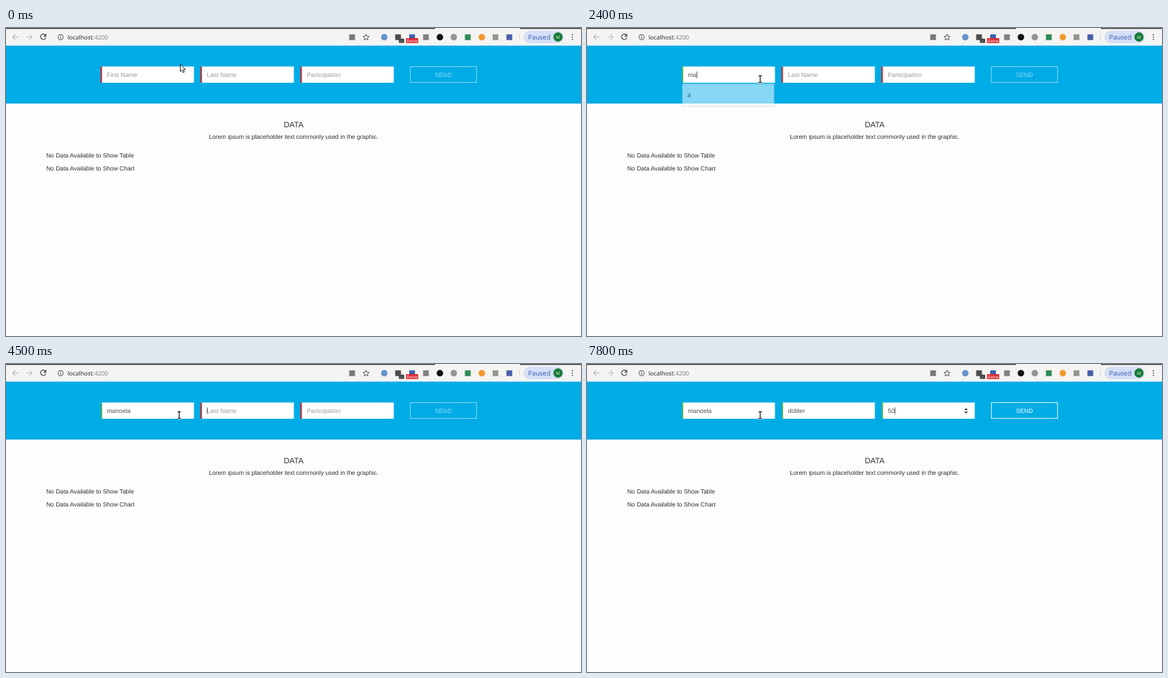
Recreate the animation shown at these times as an HTML page. Size 800 by 428 pixels, loop 8 s.

```html
<!DOCTYPE html>
<html lang="en">
<head>
<meta charset="utf-8">
<title>Participation form</title>
<style>
  html, body { margin: 0; width: 100%; height: 100%; overflow: hidden; background: #fefdfe; }
  svg { display: block; width: 100vw; height: 100vh; }
  text { font: 8.45px "Liberation Sans", Arial, sans-serif; fill: #2b2f33; text-rendering: geometricPrecision; }
  .ui { font-family: "Noto Sans", sans-serif; }
  .mid { text-anchor: middle; }
  .entry { font-size: 8.6px; fill: #495057; }
  .hint { fill: #969a9e; }
  .line { fill: none; stroke: #4b4b4b; stroke-width: 1.2; }
</style>
</head>
<body>
<svg viewBox="0 0 800 428">
  <rect width="800" height="428" fill="#fefdfe"/>

  <!-- browser toolbar -->
  <rect width="800" height="24.5" fill="#f5f4f3"/>
  <path d="M0 0H597V1.2H0zM715 0H800V1.2H715z" fill="#3b3a37"/>
  <path class="line" d="M17.5 12.5H9.5M13 8.7L9.2 12.5L13 16.3" style="stroke:#b9b8b7"/>
  <path class="line" d="M28 12.5H36M32.5 8.7L36.3 12.5L32.5 16.3" style="stroke:#c3c2c1"/>
  <path class="line" d="M54.7 9.6A3.8 3.8 0 1 0 55.5 13.5"/>
  <path d="M56 7.8V12H51.8z" fill="#4b4b4b"/>
  <circle class="line" cx="76" cy="12.7" r="3.7" style="stroke-width:.9"/>
  <path d="M75.5 12.1H76.5V15H75.5zM75.5 10.3H76.5V11.3H75.5z" fill="#4b4b4b"/>
  <text class="ui" x="85.7" y="15.7" style="font-size:8.3px">localhost<tspan fill="#85878a">:4200</tspan></text>
  <path class="line" d="M501 8.6L502.2 11.4L505.2 11.7L502.9 13.7L503.6 16.7L501 15.1L498.4 16.7L499.1 13.7L496.8 11.7L499.8 11.4z" style="stroke-width:.9"/>
  <g id="badges"></g>
  <rect x="546.5" y="14.8" width="7.5" height="6" rx="1" fill="#4a4a4a"/>
  <text class="ui mid" x="550.2" y="18.8" style="font-size:5px;fill:#fff">..</text>
  <rect x="556.5" y="14" width="17" height="7" rx="1.2" fill="#d92d35"/>
  <text class="ui mid" x="565" y="19.6" style="font-size:5.8px;fill:#fff">Extra</text>
  <path d="M714.5 8V18" stroke="#d3d3d3" stroke-width=".8"/>
  <rect x="720" y="4" width="56" height="17" rx="8.5" fill="#d5e0f6"/>
  <text class="ui" x="726.5" y="15.8" style="font-size:9px;fill:#3b5fbb">Paused</text>
  <circle cx="768" cy="12.5" r="6.4" fill="#187a35"/>
  <text class="ui mid" x="768" y="14.7" style="font-size:6px;fill:#d7eedc">M</text>
  <path d="M788 9.4h.01M788 12.6h.01M788 15.8h.01" stroke="#4b4b4b" stroke-width="1.8" stroke-linecap="round"/>

  <!-- page -->
  <rect y="24.5" width="800" height="80.5" fill="#00ace6"/>
  <g id="fields"></g>
  <g id="send">
    <rect x="562.7" y="53.7" width="92" height="22" fill="none" stroke="#fff" stroke-width=".9"/>
    <text class="mid" x="608.6" y="67.8" style="font-size:8.5px;fill:#fff">SEND</text>
  </g>
  <g id="spinner" fill="#3d3d3d">
    <path d="M524.8 64L527.4 61.2L530 64zM524.8 66L527.4 68.8L530 66z"/>
  </g>
  <text class="mid" x="400.2" y="138.3" style="font-size:10.9px">DATA</text>
  <text class="mid" x="400.2" y="154">Lorem ipsum is placeholder text commonly used in the graphic.</text>
  <text x="56" y="180">No Data Available to Show Table</text>
  <text x="56" y="198.3">No Data Available to Show Chart</text>

  <g id="suggest">
    <rect x="131" y="78" width="131.3" height="31.8" rx="1" fill="#000" opacity=".16"/>
    <rect x="131.4" y="77.2" width="130.2" height="31.4" rx="1" fill="#fff" stroke="#c4c8ca" stroke-width=".6"/>
    <text class="ui" x="138.3" y="95.9" style="font-size:9px;font-weight:500;fill:#1c1c1c">a</text>
  </g>
  <rect id="caret" y="60.3" width=".8" height="9.2" fill="#333"/>
  <path id="arrow" d="M0 0V10.2L2.3 8.2L3.9 11.6L5.6 10.8L4.1 7.5H7.1z" fill="#fff" stroke="#111" stroke-width=".9"/>
  <g id="beam" fill="none">
    <path d="M-2.6 -4.7H2.6M-2.6 4.7H2.6M0 -4.7V4.7" stroke="#fff" stroke-width="2.6"/>
    <path d="M-2.4 -4.7H2.4M-2.4 4.7H2.4M0 -4.7V4.7" stroke="#222" stroke-width="1.3"/>
  </g>
</svg>
<script>
const LOOP = 8000, STEP = 100, LAST_STEP = 7800, BLINK = 500;
const $ = id => document.getElementById(id);
const clamp = v => Math.max(0, Math.min(1, v));
const show = (el, on) => el.setAttribute('visibility', on ? 'visible' : 'hidden');

// Extension buttons as plain shapes: [x, colour, round]
$('badges').innerHTML = [
  [481.5, '#77797b', 0], [526.3, '#6795cd', 1], [545.5, '#4b4b4b', 0],
  [565, '#3b61b3', 0], [584.3, '#808284', 0], [603.7, '#111', 1],
  [623, '#929496', 1], [642.5, '#2f8b57', 0], [662, '#f09a2c', 1],
  [681, '#96958f', 0], [700.3, '#4b5fa8', 0]
].map(([x, fill, round]) => round
  ? `<circle cx="${x}" cy="12.8" r="4.5" fill="${fill}"/>`
  : `<rect x="${x - 4}" y="8.8" width="8" height="8" fill="${fill}"/>`).join('');

const fields = ['First Name', 'Last Name', 'Participation'].map((hint, i) => {
  const x = 131.5 + i * 139;
  const g = document.createElementNS('http://www.w3.org/2000/svg', 'g');
  g.innerHTML = `<rect x="${x + .5}" y="53.5" width="129.5" height="22.6" fill="#fff"/>
    <rect y="53.5" height="22.6"/><text class="entry" x="${x + 8.9}" y="67.8"></text>`;
  $('fields').append(g);
  return { hint, x, bar: g.children[1], text: g.children[2] };
});

// Focus and key presses: [time, field, value]
const typed = (field, word, times) => times.map((t, i) => [t, field, word.slice(0, i + 1)]);
const inputs = [
  [500, 0, ''], ...typed(0, 'manoela', [2300, 2400, 3000, 3200, 3300, 3400, 3500]),
  [4100, 1, ''], ...typed(1, 'dobler', [5200, 5300, 5400, 5600, 5700, 5800]),
  [6200, 2, ''], ...typed(2, '50', [7200, 7400])
];

function drawFields(t) {
  const values = ['', '', ''];
  let current = null;
  for (const input of inputs) {
    if (input[0] > t) break;
    current = input;
    values[input[1]] = input[2];
  }
  fields.forEach(({ hint, x, bar, text }, i) => {
    const value = values[i];
    text.textContent = value || hint;
    text.classList.toggle('hint', !value);
    bar.setAttribute('x', value ? x + .6 : x);
    bar.setAttribute('width', value ? 1.6 : 2.1);
    bar.setAttribute('fill', value ? '#36a83c' : '#bd2a2a');
  });
  show($('caret'), current && Math.floor((t - current[0]) / BLINK) % 2 === 0);
  if (current) {
    const { x, text } = fields[current[1]];
    const width = current[2] ? text.getComputedTextLength() : 0;
    $('caret').setAttribute('x', x + 9.1 + width);
  }
  show($('spinner'), current && current[1] === 2);
  $('send').setAttribute('opacity', values[2] ? 1 : .58);
}

function drawSuggestion(t) {
  const opacity = t < 2300 ? clamp((t - 500) / 200) : [.85, .52][(t - 2300) / STEP] || 0;
  const scale = .96 + .04 * opacity;
  $('suggest').setAttribute('opacity', opacity);
  $('suggest').setAttribute('transform',
    `translate(196.5 93) scale(${scale}) translate(-196.5 -93)`);
}

function drawPointer(t) {
  const p = clamp(t / 400), ease = p * p * (3 - 2 * p);
  const y = 50.3 + 20.7 * ease, overField = y > 53.5;
  $('arrow').setAttribute('transform', `translate(${242.5 - 1.5 * ease} ${y})`);
  $('beam').setAttribute('transform', `translate(${242.5 - 1.5 * ease} ${y})`);
  show($('arrow'), !overField);
  show($('beam'), overField);
}

const start = performance.now();
function frame() {
  const elapsed = (performance.now() - start) % LOOP;
  const t = Math.min(Math.floor(elapsed / STEP) * STEP, LAST_STEP);
  drawFields(t);
  drawSuggestion(t);
  drawPointer(t);
  requestAnimationFrame(frame);
}
frame();
</script>
</body>
</html>
```
